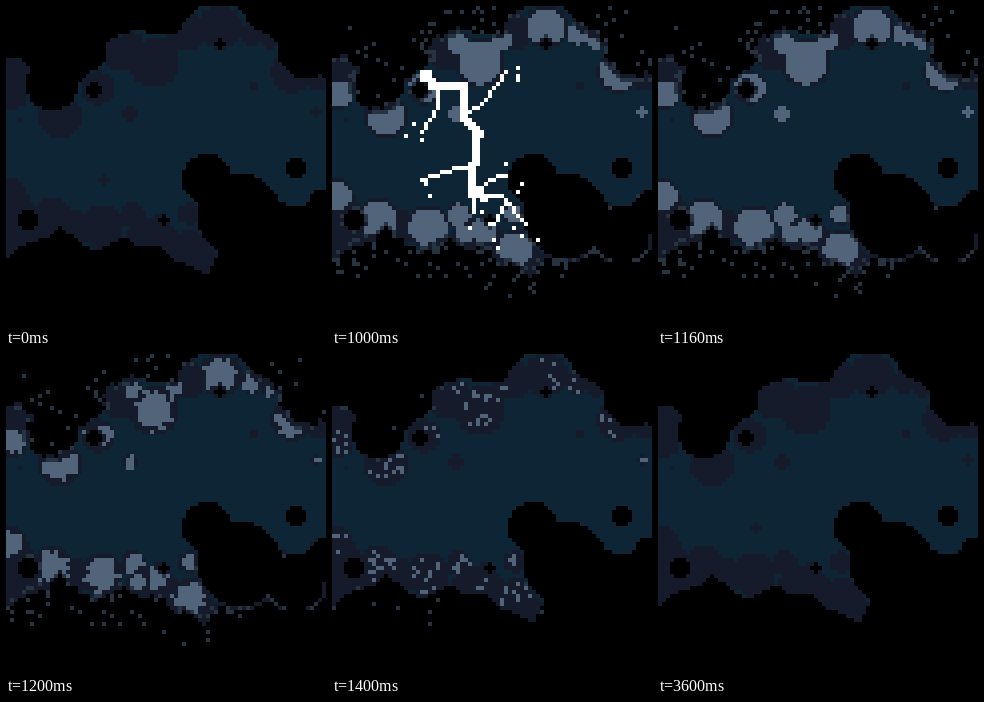
These frames come from a looping animation (320x320 px, 5 s). An HTML page with a canvas:

```html
<!DOCTYPE html>
<html lang="en">
<head>
<meta charset="utf-8">
<title>Lightning in the clouds</title>
<style>
  html, body { margin: 0; height: 100%; overflow: hidden; background: #000; }
  canvas { display: block; width: 100vw; height: 100vh; image-rendering: pixelated; }
</style>
</head>
<body>
<canvas id="stage" width="80" height="80"></canvas>
<script>
const ctx = document.getElementById('stage').getContext('2d');
const SIZE = 80, CELL = 4, LOOP = 5000, FLASH_START = 1000, STEP = 100, FLASH_STEPS = 5;
const BLACK = '#000', NAVY = '#151b2a', TEAL = '#0d2534', MID = '#263442', SLATE = '#51647a', WHITE = '#fff';

// Shapes use stage pixels and are sampled at the centre of each cell. Discs are [x, y, radius].
const cloud = new Path2D(`M0 54L12 52 27 66 72 76 100 56 100 36 132 22 148 30 168 30 176 20 192 0
  232 0 244 20 268 32 272 44 320 72 320 182 306 186 298 202 270 196 216 240 210 250 202 268
  170 254 152 238 130 240 120 230 92 244 80 240 54 220 44 230 16 240 0 254Z`);
const hollows = [[46, 78, 26], [300, 44, 28], [88, 84, 8], [22, 214, 10], [290, 162, 10.5], [214, 38, 4.5], [158, 214, 4.5]];
const rocks = [[201, 173, 25], [234, 210, 42], [290, 228, 28], [324, 206, 24]];
const puffs = [[6, 88, 16], [54, 110, 22], [92, 82, 17], [126, 38, 12], [148, 57, 25], [170, 34, 12], [214, 21, 22],
  [246, 28, 12], [264, 35, 9], [287, 65, 22], [124, 108, 8], [310, 106, 5],
  [4, 190, 18], [46, 214, 22], [96, 221, 22], [127, 209, 13], [152, 224, 15], [132, 229, 12], [183, 244, 20], [183, 208, 11]];
const shades = [[4, 72, 22], [114, 48, 17], [184, 26, 18], [312, 72, 14], [248, 80, 3], [14, 114, 3],
  [6, 220, 32], [70, 222, 17], [140, 228, 16], [164, 240, 16], [202, 258, 14]];
const restingSpot = [98, 174, 5];

// Key points of the bolt; the first line is the thick trunk.
const bolt = [
  [[92, 66], [98, 76], [130, 76], [132, 112], [144, 126], [136, 184], [148, 188]],
  [[104, 78], [106, 102], [90, 124]],
  [[138, 104], [150, 98], [174, 66]],
  [[136, 160], [118, 164], [90, 174]],
  [[140, 186], [156, 174], [174, 170]],
  [[148, 188], [170, 190], [190, 214]],
  [[174, 198], [162, 218]],
  [[142, 190], [142, 206]]
];

// How the glow fades: solid core, scattered share, lit edges and stray specks in the dark.
const fade = [
  { core: 0.86, scatter: 0, rim: 0.6, specks: 0.15 },
  { core: 0.86, scatter: 0, rim: 0.5, specks: 0.14 },
  { core: 0.64, scatter: 0.4, rim: 0.3, specks: 0.1 },
  { core: 0.34, scatter: 0.32, rim: 0.15, specks: 0.035 },
  { core: 0, scatter: 0.18, rim: 0.06, specks: 0.01 }
];

const noise = (x, y) => {
  const n = Math.sin(x * 127.1 + y * 311.7) * 43758.5453;
  return n - Math.floor(n);
};
const distance = ([cx, cy], x, y) => Math.hypot(x - cx, y - cy);
const inside = (discs, x, y) => discs.some(disc => distance(disc, x, y) <= disc[2]);

function baseColor(x, y) {
  if (!ctx.isPointInPath(cloud, x, y) || inside(hollows, x, y) || inside(rocks, x, y)) return BLACK;
  return inside(puffs, x, y) || inside(shades, x, y) ? NAVY : TEAL;
}

const cells = [];
for (let row = 0; row < SIZE; row++) {
  for (let col = 0; col < SIZE; col++) {
    const x = col * CELL + 2, y = row * CELL + 2;
    cells.push({ col, row, x, y, base: baseColor(x, y), grain: noise(col, row) });
  }
}

// Distance in cells to the nearest cell of a colour, up to a limit.
function distanceTo(cell, color, limit) {
  let best = limit;
  for (let row = Math.max(0, cell.row - limit); row <= Math.min(SIZE - 1, cell.row + limit); row++) {
    for (let col = Math.max(0, cell.col - limit); col <= Math.min(SIZE - 1, cell.col + limit); col++) {
      if (cells[row * SIZE + col].base === color) {
        best = Math.min(best, Math.hypot(col - cell.col, row - cell.row));
      }
    }
  }
  return best;
}
for (const cell of cells) {
  const { x, y, base } = cell;
  if (base === NAVY) {
    cell.onEdge = distanceTo(cell, BLACK, 2) <= 1;
    cell.glow = Math.min(...puffs.map(puff => distance(puff, x, y) / puff[2]));
  }
  if (base === BLACK) {
    cell.toCloud = distanceTo(cell, NAVY, 12);
    cell.rock = inside(rocks, x, y) || inside(hollows.slice(2), x, y);
    cell.outline = !cell.rock && x > 200 && y > 180 && y < 256 &&
      rocks.some(rock => distance(rock, x, y) < rock[2] + CELL);
  }
}

function flashColor(cell, level) {
  const { core, scatter, rim, specks } = fade[level];
  if (cell.base === NAVY) {
    if (cell.onEdge) return cell.grain < rim ? MID : NAVY;
    if (cell.glow <= core || (cell.glow <= 0.86 && cell.grain < scatter)) return SLATE;
  }
  if (cell.base === BLACK && !cell.rock) {
    if (level < 3 && cell.outline) return cell.grain < rim ? MID : NAVY;
    if (level < 3 && cell.toCloud <= 1 && cell.grain > 0.5) return NAVY;
    if (cell.grain < specks * (1 - cell.toCloud / 12)) return MID;
  }
  return cell.base;
}

function dot(x, y, size = 1) {
  ctx.fillRect(Math.floor(x / CELL), Math.floor(y / CELL), size, size);
}

function line(points, size) {
  for (let i = 1; i < points.length; i++) {
    const [x0, y0] = points[i - 1], [x1, y1] = points[i];
    const count = Math.ceil(Math.max(Math.abs(x1 - x0), Math.abs(y1 - y0)) / CELL);
    for (let n = 0; n <= count; n++) {
      dot(x0 + (x1 - x0) * n / count, y0 + (y1 - y0) * n / count, size);
    }
  }
}

function drawBolt() {
  ctx.fillStyle = WHITE;
  dot(88, 64, 3);
  bolt.forEach((points, i) => {
    line(points, i ? 1 : 2);
    if (!i) return;
    // Sparks fly around the tip of each branch.
    const [x, y] = points[points.length - 1];
    for (let n = 0; n < 3; n++) {
      dot(x + (noise(i, n) - 0.5) * 40, y + (noise(n, i + 9) - 0.3) * 40);
    }
  });
}

function draw(level) {
  const flashing = level >= 0;
  for (const cell of cells) {
    const resting = !flashing && inside([restingSpot], cell.x, cell.y);
    ctx.fillStyle = flashing ? flashColor(cell, level) : resting ? NAVY : cell.base;
    ctx.fillRect(cell.col, cell.row, 1, 1);
  }
  if (level === 0) drawBolt();
}

let shown = null;
const start = performance.now();
function tick() {
  const time = (performance.now() - start) % LOOP;
  const step = Math.floor((time - FLASH_START) / STEP);
  const level = step >= 0 && step < FLASH_STEPS ? step : -1;
  if (level !== shown) draw(shown = level);
  requestAnimationFrame(tick);
}
tick();
</script>
</body>
</html>
```
